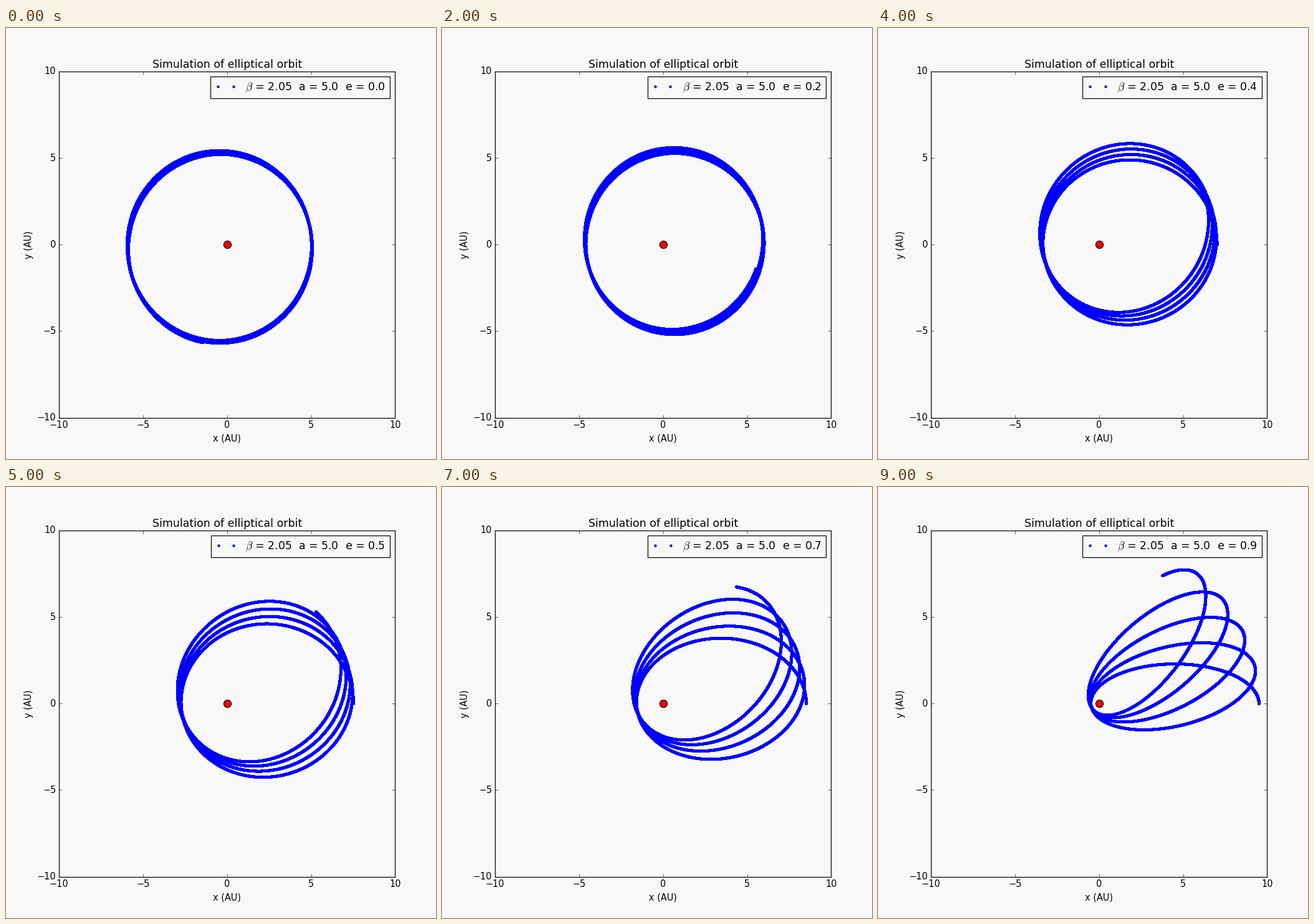
These frames come from a looping animation (690 by 693 pixels, 10000 ms). A matplotlib script:

```python
import numpy as np
import matplotlib.pyplot as plt
from matplotlib.animation import FuncAnimation

WIDTH, HEIGHT, DPI = 690, 693, 87
LEFT, RIGHT, TOP, BOTTOM = 85.2, 624.45, 69.8, 626.6
BG = "#f8f8f8"

BETA = 2.05          # force falls off as 1 / r**BETA
A = 5.0              # semi-major axis, AU
GM = 4 * np.pi ** 2  # AU^3 / yr^2
DT, YEARS = 0.001, 50
ECC = np.arange(10) / 10


def orbits():
    """Integrate every eccentricity at once (Euler-Cromer), from aphelion."""
    pos = np.array([A * (1 + ECC), np.zeros_like(ECC)])
    vel = np.array([np.zeros_like(ECC), np.sqrt(GM * (1 - ECC) / (A * (1 + ECC)))])
    path = [pos]
    for _ in range(round(YEARS / DT)):
        r = np.hypot(*pos)
        vel = vel - GM * pos / r ** (BETA + 1) * DT
        pos = pos + vel * DT
        path.append(pos)
    return np.array(path)


def label(e):
    return rf"$\beta$ = {BETA}  a = {A}  e = {e:.1f}"


plt.style.use("classic")
plt.rcParams.update({
    "font.sans-serif": ["DejaVu Sans"],
    "savefig.dpi": "figure",
    "savefig.facecolor": "auto",
})

paths = orbits()
fig = plt.figure(figsize=((WIDTH + 1e-6) / DPI, (HEIGHT + 1e-6) / DPI),
                 dpi=DPI, facecolor=BG)
ax = fig.add_axes([LEFT / WIDTH, 1 - BOTTOM / HEIGHT,
                   (RIGHT - LEFT) / WIDTH, (BOTTOM - TOP) / HEIGHT], facecolor=BG)
ax.set(xlim=(-10, 10), ylim=(-10, 10), xlabel="x (AU)", ylabel="y (AU)",
       title="Simulation of elliptical orbit")
ax.set_xticks(range(-10, 11, 5))
ax.set_yticks(range(-10, 11, 5))

orbit, = ax.plot([], [], "b.", label=label(0))
ax.plot(0, 0, "ro", ms=10, mew=1)
legend = ax.legend(loc="upper right", facecolor=BG)


def draw(i):
    orbit.set_data(paths[:, 0, i], paths[:, 1, i])
    legend.get_texts()[0].set_text(label(ECC[i]))
    return orbit, legend


anim = FuncAnimation(fig, draw, frames=len(ECC), interval=1000,
                     repeat=True, repeat_delay=0, blit=False)
plt.show()
```
